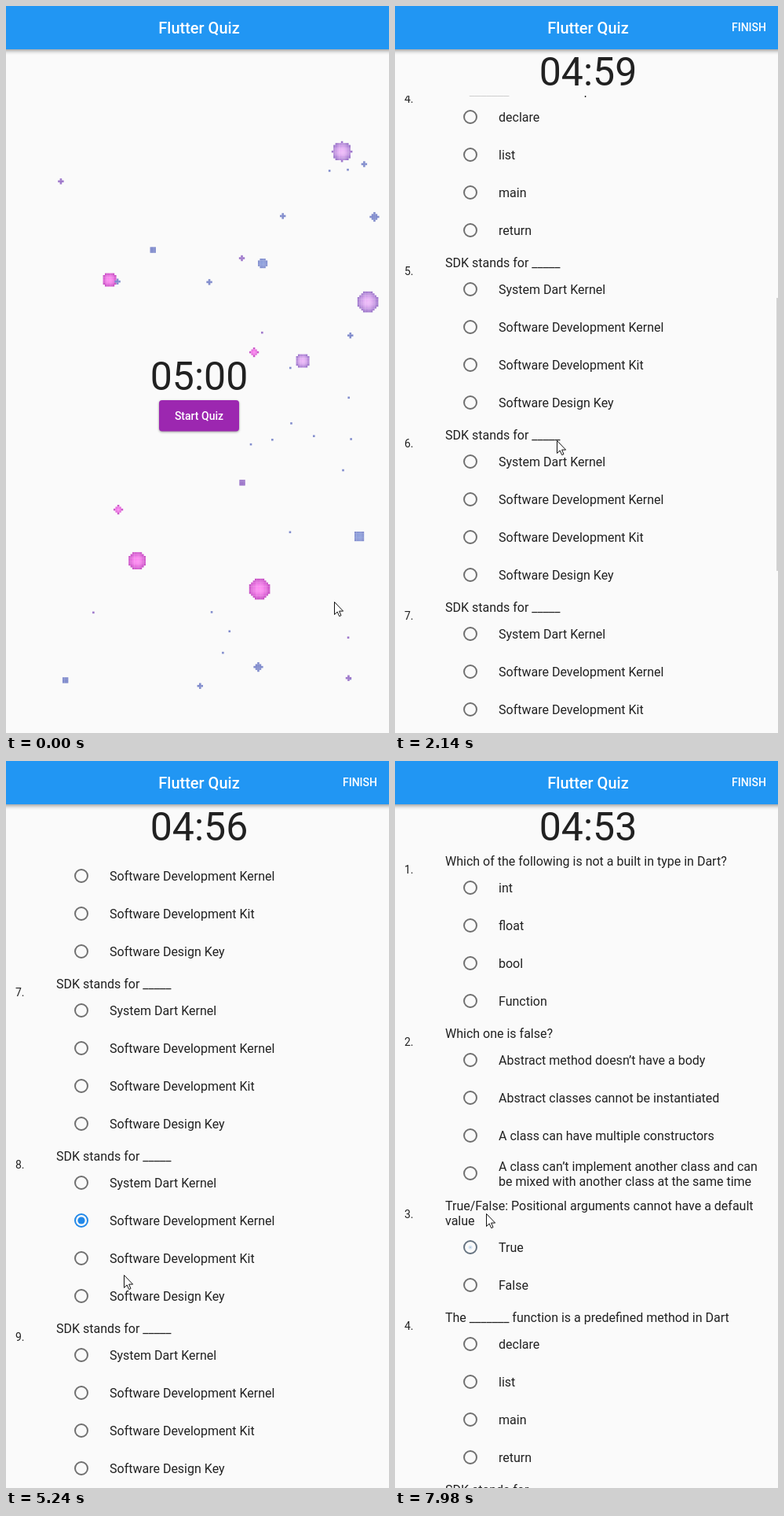
An HTML page with a canvas for the animation above (8 s loop, 488 px wide and 924 px high).

```html
<!DOCTYPE html>
<html lang="en">
<head>
<meta charset="utf-8">
<title>Flutter Quiz</title>
<style>
html, body { margin: 0; width: 100%; height: 100%; overflow: hidden; background: #fafafa; }
canvas { display: block; width: 488px; height: 924px; }
</style>
</head>
<body>
<canvas id="stage" width="488" height="924"></canvas>
<script>
const ctx = document.getElementById('stage').getContext('2d');
const W = 488, H = 924, LOOP = 8000, QUIZ_START = 830;
const LIST_TOP = 114, MAX_SCROLL = 1081, ROW = 48, LINE = 19;
const INK = 'rgba(0,0,0,.87)', BLUE = [33, 136, 233], GREY = [112, 112, 112];

const clamp = (v, a = 0, b = 1) => Math.min(b, Math.max(a, v));
const mix = (a, b, p) => a + (b - a) * p;
const rgb = (a, b, p) => `rgb(${a.map((v, i) => Math.round(mix(v, b[i], p)))})`;
const smooth = p => p * p * (3 - 2 * p);

function text(str, x, y, size, { color = INK, weight = 400, align = 'left' } = {}) {
  ctx.font = `${weight} ${size}px Roboto, sans-serif`;
  ctx.textAlign = align;
  ctx.fillStyle = color;
  ctx.fillText(str, x, y);
}

function disc(x, y, r, color) {
  ctx.fillStyle = color;
  ctx.beginPath();
  ctx.arc(x, y, r, 0, 2 * Math.PI);
  ctx.fill();
}

function shadow(blur, dy, alpha) {
  ctx.shadowColor = `rgba(0,0,0,${alpha})`;
  ctx.shadowBlur = blur;
  ctx.shadowOffsetY = dy;
}

// ---- Quiz content ----
const sdk = {
  title: ['SDK stands for _____'],
  options: ['System Dart Kernel', 'Software Development Kernel', 'Software Development Kit', 'Software Design Key']
};
const questions = [
  { title: ['Which of the following is not a built in type in Dart?'], options: ['int', 'float', 'bool', 'Function'] },
  { title: ['Which one is false?'], options: [
    'Abstract method doesn’t have a body',
    'Abstract classes cannot be instantiated',
    'A class can have multiple constructors',
    'A class can’t implement another class and can\nbe mixed with another class at the same time'] },
  { title: ['True/False: Positional arguments cannot have a default', 'value'], options: ['True', 'False'] },
  { title: ['The _______ function is a predefined method in Dart'], options: ['declare', 'list', 'main', 'return'] },
  ...Array.from({ length: 5 }, () => ({ ...sdk }))
];
const clicks = { '8:1': 4500, '9:0': 5850, '3:0': 7955 };

const radios = [];
let nextY = 127;
questions.forEach((q, n) => {
  q.y = nextY;
  const first = nextY + 34 + LINE * (q.title.length - 1);
  q.options.forEach((label, i) =>
    radios.push({ lines: label.split('\n'), y: first + ROW * i, clicked: clicks[`${n + 1}:${i}`] ?? Infinity }));
  nextY = first + ROW * (q.options.length - 1) + 41;
});

// ---- Timeline ----
const down = { from: 1680, step: 84 }, up = { from: 6500, step: 50 };

// Wheel notches of 100 px each
const wheel = (t, { from, step }) => clamp(100 * (Math.floor((t - from) / step) + 1), 0, MAX_SCROLL);
const scrollAt = t => wheel(t, down) - wheel(t, up);

function thumbAlpha(t) {
  const { from, step } = t < up.from ? down : up;
  return clamp((t - from - 150) / 250) * (1 - clamp((t - from - 10 * step - 600) / 300));
}

// Pointer stops: time, x, y
const stops = [
  [70, 418, 757], [560, 262, 533], [1060, 262, 533], [1440, 201, 543], [1910, 206, 552],
  [2520, 206, 552], [2830, 94, 485], [2990, 94, 485], [3380, 153, 618], [3700, 94, 556],
  [4150, 97, 627], [4450, 96, 590], [4930, 96, 592], [5240, 150, 653], [5740, 94, 763],
  [5950, 94, 763], [6400, 256, 613], [7050, 256, 613], [7620, 95, 619], [7900, 95, 619], [7975, 116, 575]
];
function cursorAt(t) {
  const i = stops.findIndex(s => s[0] > t);
  const b = stops.at(i), a = stops[i - 1] ?? b;
  if (i <= 0) return b.slice(1);
  const p = smooth((t - a[0]) / (b[0] - a[0]));
  return [1, 2].map(k => Math.round(mix(a[k], b[k], p)));
}

// ---- Floating particles ----
const tints = {
  pink: [[255, 142, 243], [200, 82, 197]],
  violet: [[238, 186, 250], [158, 120, 203]],
  blue: [[146, 164, 222], [130, 141, 205]]
};
const CELL = 2.4;

function randomizer(seed) {
  return () => (seed = seed * 16807 % 2147483647) / 2147483647;
}

function swarm(seed, large) {
  const rand = randomizer(seed);
  const dust = Array.from({ length: 32 }, () => {
    const tint = rand() < .25 ? 'violet' : 'blue';
    return [tint, W * Math.sqrt(rand()), mix(200, 890, rand()), 2 + 3 * rand() ** 3];
  });
  return large.concat(dust);
}

const before = swarm(11, [
  ['pink', 132, 348, 9], ['pink', 167, 705, 11], ['pink', 143, 640, 5], ['pink', 316, 440, 5],
  ['pink', 323, 741, 13], ['violet', 428, 185, 12], ['violet', 461, 376, 13], ['violet', 378, 451, 9],
  ['blue', 327, 327, 6], ['blue', 450, 674, 7]
]);
const after = swarm(29, [
  ['pink', 138, 401, 12], ['pink', 46, 593, 11], ['pink', 37, 632, 11], ['pink', 97, 381, 9],
  ['pink', 306, 447, 6], ['violet', 108, 112, 7], ['violet', 100, 912, 10], ['violet', 41, 170, 6],
  ['blue', 304, 338, 7], ['blue', 250, 580, 8]
]);

function blob(x, y, r, [core, edge]) {
  const n = Math.ceil(r / CELL);
  for (let i = -n; i <= n; i++) for (let j = -n; j <= n; j++) {
    const d = Math.hypot(i, j) * CELL / r;
    if (d > 1) continue;
    ctx.fillStyle = rgb(core, edge, r < 5 ? 1 : d * d);
    ctx.fillRect(x + (i - .5) * CELL, y + (j - .5) * CELL, CELL + .2, CELL + .2);
  }
}

function particles(set, scale, spread) {
  if (scale <= .05) return;
  for (const [tint, x, y, r] of set)
    blob(mix(W / 2, x, spread), mix(H / 2, y, spread), r * scale, tints[tint]);
}

// ---- Screens ----
function startScreen(t, overButton) {
  const out = clamp((t - 70) / 290), back = clamp((t - 290) / 300);
  particles(before, 1 - out, 1 + .25 * out);
  particles(after, back, .75 + .25 * back);
  text('05:00', 246, 488, 50, { align: 'center' });

  ctx.save();
  shadow(overButton ? 5 : 3, overButton ? 2 : 1, .4);
  ctx.fillStyle = overButton ? '#ae4cbd' : '#9c27b0';
  ctx.beginPath();
  ctx.roundRect(195, 501, 102, 39.5, 4);
  ctx.fill();
  ctx.shadowColor = 'transparent';
  ctx.clip();
  if (t >= 590) disc(260, 531, 20, 'rgba(255,255,255,.17)');
  ctx.restore();
  text('Start Quiz', 246, 526, 14, { color: '#fff', weight: 500, align: 'center' });
}

function radio({ lines, clicked }, y, t, hovered) {
  const age = t - clicked, on = clamp(age / 200);
  if (hovered) disc(96, y, 20, 'rgba(0,0,0,.04)');
  if (age >= 0 && age < 450) disc(96, y, 20 * on, `rgba(33,136,233,${.16 * (1 - age / 450)})`);
  const color = rgb(GREY, BLUE, on);
  ctx.strokeStyle = color;
  ctx.lineWidth = 2;
  ctx.beginPath();
  ctx.arc(96, y, 8, 0, 2 * Math.PI);
  ctx.stroke();
  if (on) disc(96, y, 4.6 * on, color);
  lines.forEach((line, i) => text(line, 132, y + 6 + LINE * (i - (lines.length - 1) / 2), 16));
}

function quizScreen(t, scroll, target) {
  const left = 300 - Math.max(0, Math.floor((t - 1600) / 1011) + 1);
  const two = n => String(n).padStart(2, '0');
  text(`${two(Math.floor(left / 60))}:${two(left % 60)}`, 246, 101, 50, { align: 'center' });

  ctx.save();
  ctx.beginPath();
  ctx.rect(0, LIST_TOP, W, H - LIST_TOP);
  ctx.clip();
  questions.forEach((q, n) => {
    const y = q.y - scroll;
    text(`${n + 1}.`, 12, y + 16, 14);
    q.title.forEach((line, i) => text(line, 64, y + 6 + LINE * i, 16));
  });
  for (const r of radios) radio(r, r.y - scroll, t, r === target);

  const view = H - LIST_TOP, total = view + MAX_SCROLL;
  ctx.fillStyle = `rgba(0,0,0,${.16 * thumbAlpha(t)})`;
  ctx.fillRect(486, LIST_TOP + scroll / total * view, 2, view * view / total);
  ctx.restore();
}

function appBar(inQuiz) {
  ctx.save();
  shadow(5, 2, .4);
  ctx.fillStyle = '#2196f3';
  ctx.fillRect(-10, -10, W + 20, 65);
  ctx.restore();
  const style = { color: '#fff', weight: 500, align: 'center' };
  text('Flutter Quiz', 246, 35, 20, style);
  if (inQuiz) text('FINISH', 451, 32, 14, style);
}

const arrow = new Path2D('M.5 .5V16.5L4.2 13L6.7 18.6L9 17.6L6.6 12.1H11.6Z');
const hand = new Path2D('M-1.5 1.5Q0 -.5 1.5 1.5V8Q3.5 7 4.5 8.7Q6.5 7.8 7.4 9.6Q10 9 10.5 11.5V16' +
  'Q10.5 18 8.5 20V23.5H-1V21L-7 14Q-8 11.5 -5.5 11.5L-1.5 15ZM1.5 8V12M4.5 9V12.5M7.4 10V13');

function pointer(x, y, shape) {
  ctx.save();
  ctx.translate(x, y);
  ctx.fillStyle = '#fff';
  ctx.strokeStyle = '#111';
  ctx.lineWidth = 1;
  ctx.lineJoin = 'round';
  ctx.fill(shape);
  ctx.stroke(shape);
  ctx.restore();
}

function draw() {
  const t = performance.now() % LOOP;
  const inQuiz = t >= QUIZ_START, scroll = scrollAt(t), [x, y] = cursorAt(t);
  const overButton = t < 1060 && x < 297 && y < 541;
  const target = inQuiz && Math.abs(x - 96) <= 22 &&
    radios.find(r => Math.abs(r.y - scroll - y) <= ROW / 2);

  ctx.fillStyle = '#fafafa';
  ctx.fillRect(0, 0, W, H);
  if (inQuiz) quizScreen(t, scroll, target);
  else startScreen(t, overButton);
  appBar(inQuiz);
  pointer(x, y, target || overButton ? hand : arrow);
  requestAnimationFrame(draw);
}
draw();
</script>
</body>
</html>
```
